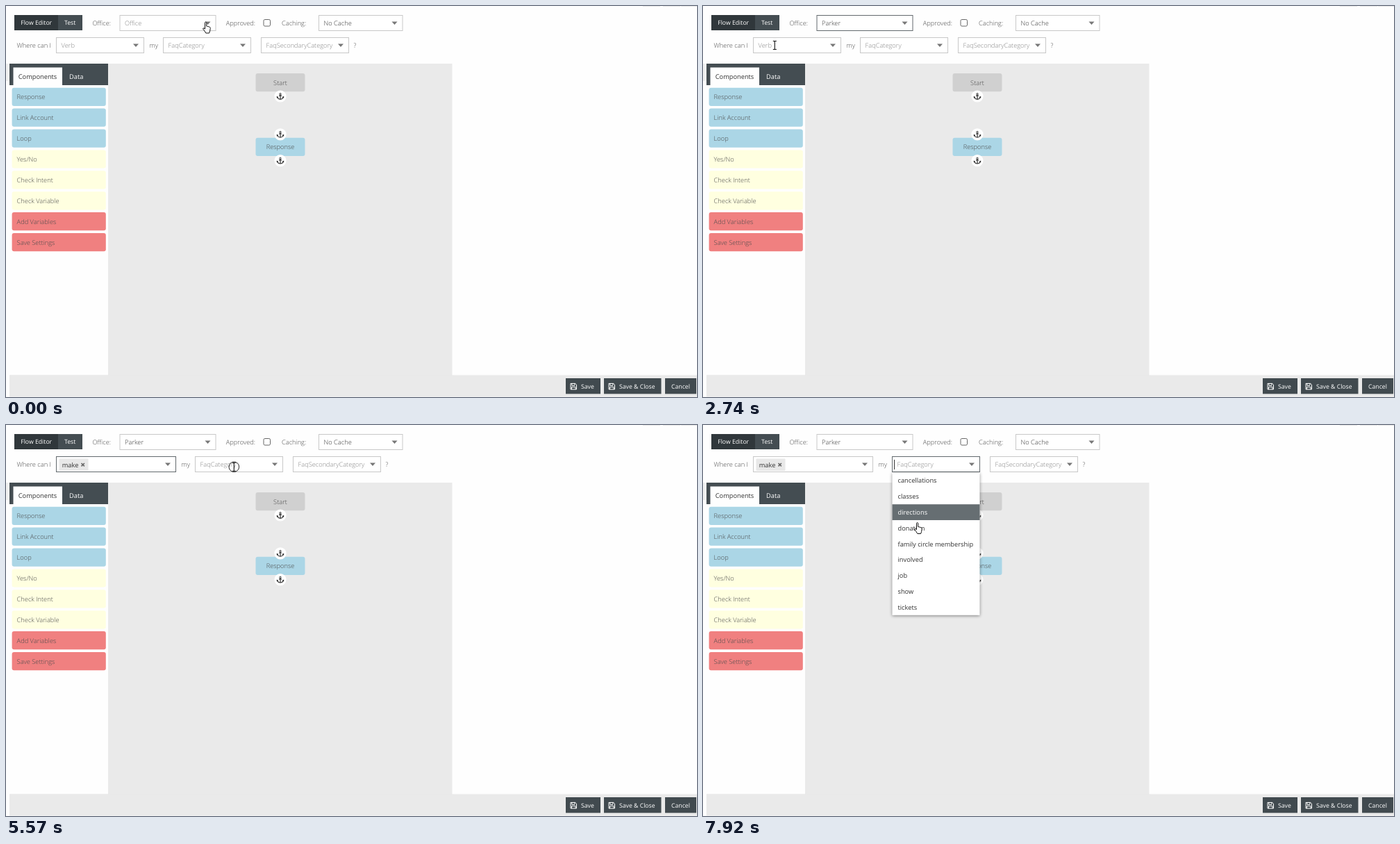
Animation, 995 px wide and 563 px high, one loop 8 s. Source, as an HTML page:

```html
<!DOCTYPE html>
<html lang="en">
<head>
<meta charset="utf-8">
<title>Flow editor</title>
<style>
html, body { margin: 0; width: 995px; height: 563px; overflow: hidden; background: #fefefe; }
svg { display: block; }
text { font: 300 9.28px "Open Sans", "Noto Sans", sans-serif; text-rendering: geometricPrecision; white-space: pre; }
.r { font-weight: 400; }
.b { font-weight: 400; font-size: 8.7px; }
.menu { filter: drop-shadow(0 1px 2px rgba(0, 0, 0, .45)); }
</style>
</head>
<body>
<svg width="995" height="563" viewBox="0 0 995 563">
  <g id="back"></g>
  <g id="live"></g>
</svg>
<script>
const LOOP = 8000, ROW = 22.8, DARK = '#444d52', TEXT = '#4a4a4a', HINT = '#858585';

const box = (x, y, w, h, fill, more = '') =>
  `<rect x="${x}" y="${y}" width="${w}" height="${h}" fill="${fill}" ${more}/>`;
// Text placed by the middle of its capitals
const text = (x, mid, s, fill = TEXT, more = '') =>
  `<text x="${x}" y="${mid + 3.3}" fill="${fill}" ${more}>${s}</text>`;
const path = (d, more) => `<path d="${d}" ${more}/>`;
const at = (x, y, s) => `<g transform="translate(${x} ${y})">${s}</g>`;

function field(x, y, w, label, focus, fill = HINT) {
  return box(x + .5, y + .5, w - 1, 22, '#fff', `stroke="${focus ? '#62696d' : '#c8c8c8'}"`) +
    text(x + 7.6, y + 11.4, label, fill) +
    path(`M${x + w - 16} ${y + 9.5}h8l-4 4.6z`, 'fill="#777"');
}

function menu(x, y, w, items, active) {
  return box(x, y, w, ROW * items.length, '#fff', 'class="menu"') +
    items.map((s, i) => {
      const on = i === active, top = y + ROW * i;
      return (on ? box(x, top, w, ROW, '#666e72') : '') +
        text(x + 8, top + 11.5, s, on ? '#fff' : '#333', 'class="r"');
    }).join('');
}

const anchor = (x, y) => at(x, y, '<circle r="8.6" fill="#fff"/>' +
  path('M0-2V4.2M-2-.8H2M-4 1.2C-3.6 3.4-2 4.3 0 4.3S3.6 3.4 4 1.2M-4.6 2.6V.8L-3 1.6M4.6 2.6V.8L3 1.6', 'fill="none" stroke="#333" stroke-width="1.2"') +
  '<circle cy="-3.2" r="1.2" fill="none" stroke="#333"/>');

const disk = x => at(x, 543, path('M.5.5H7.2L9 2.3V9H.5ZM2.3.5V3.4H6.4V.5M2 9V5.6H7.5V9', 'fill="none" stroke="#fff"'));

function button(x, w, label, icon) {
  return box(x, 536, w, 22.5, '#414a4f') + (icon ? disk(x + 6.5) : '') +
    text(x + (icon ? 22 : 9), 547.3, label, '#fff', 'class="b"');
}

function backdrop() {
  const blue = '#abd6e6', yellow = '#ffffe0', red = '#f08080';
  const parts = [['Response', blue], ['Link Account', blue], ['Loop', blue], ['Yes/No', yellow],
    ['Check Intent', yellow], ['Check Variable', yellow], ['Add Variables', red], ['Save Settings', red]];
  return [917, 946, 972].map(x => box(x, 0, 25, 1, '#e8e8e8')).join('') +
    box(12, 13, 63, 22, '#30373b') + text(21.2, 24, 'Flow Editor', '#fff', 'class="b"') +
    box(75, 13, 35, 22, DARK) + text(84, 24, 'Test', '#fff', 'class="b"') +
    text(124.5, 24.4, 'Office:') + text(316.7, 24.4, 'Approved:') + text(397, 24.4, 'Caching:') +
    box(371, 19.5, 9.5, 9.5, '#fff', 'rx="1.8" stroke="#666"') +
    field(450, 13, 121.5, 'No Cache', false, '#333') +
    text(15.6, 56.2, 'Where can I') +
    box(0, 83, 5, 25, '#f0f0f0') +
    box(5, 83, 637.5, 449, '#eaeaea') + box(5, 114, 142, 417.5, '#fefefe') +
    box(5, 83, 142, 31, DARK) + box(10.5, 88.5, 70.5, 25.5, '#fefefe') +
    text(17.7, 101.3, 'Components', '#333', 'class="r"') + text(91, 101.3, 'Data', '#fff', 'class="r"') +
    parts.map(([s, c], i) => box(8.6, 117.7 + i * 29.9, 135.2, 26.2, c, 'rx="3"') +
      text(15.6, 131 + i * 29.9, s)).join('') +
    box(359.5, 97, 71, 26.3, '#d0d0d0', 'rx="3"') + text(395, 110.2, 'Start', TEXT, 'text-anchor="middle"') +
    box(359.5, 189.7, 71, 26.3, blue, 'rx="3"') + text(395, 202.8, 'Response', TEXT, 'text-anchor="middle"') +
    anchor(395, 130) + anchor(395, 184.8) + anchor(395, 222.6) +
    box(5, 531.5, 990, 31, '#eaeaea') +
    button(806, 50, 'Save', true) + button(861, 82.5, 'Save &amp; Close', true) + button(949, 45, 'Cancel');
}

const offices = ['Aurora', 'Denver', 'general', 'Highlands Ranch', 'Littleton', 'Parker'];
const verbs = ['find out', 'get', 'make', 'purchase', 'register', 'rent'];
const topics = ['cancellations', 'classes', 'directions', 'donation', 'family circle membership',
  'involved', 'job', 'show', 'tickets'];

const outline = 'fill="#fff" stroke="#111" stroke-linejoin="round"';
const beam = path('M-2.5-6H-.6L0-5.4.6-6H2.5M0-5.4V5.4M-2.5 6H-.6L0 5.4.6 6H2.5', 'fill="none" stroke="#111" stroke-width="1.1"');
const cursors = {
  hand: path('M-2.5 2V-6.8a1.1 1.1 0 0 1 2.2 0V-2L1.5-1.6 3.3-1.1 4.7-.5Q5.4 0 5.2 1.5L4.6 5 3.6 8H-1.2L-3 5-5.2 2.2Q-5.6.6-4.2.8Z', outline),
  arrow: path('M-4-7V6L-1 3.2 1 8 3 7.1 1 2.5H5Z', outline),
  beam,
  click: beam + '<circle r="7.3" fill="none" stroke="#222"/>'
};

// Time, pointer x, pointer y, active menu row, pointer kind
const steps = [
  [0, 289, 31, 0, 'hand'], [920, 289, 31, 0, 'hand'], [1100, 281, 54, 0, 'hand'],
  [1280, 263, 90, 2, 'hand'], [1460, 243, 125, 3, 'hand'], [1640, 228, 152.5, 4, 'hand'],
  [1810, 224, 163, 5, 'hand'], [2190, 215, 150, 0, 'arrow'], [2370, 165, 105, 0, 'arrow'],
  [2550, 118, 68, 0, 'arrow'], [2740, 103.3, 56.5, 0, 'beam'], [4160, 98, 128, 2, 'hand'],
  [4350, 97, 85, 0, 'arrow'], [4890, 104, 82, 0, 'arrow'], [5230, 200, 76, 0, 'arrow'],
  [5400, 292, 64, 0, 'beam'], [5570, 328.3, 60.3, 0, 'click'], [5740, 328.3, 60.3, 0, 'beam'],
  [6080, 322, 92, 0, 'hand'], [6270, 318, 122, 1, 'hand'], [6450, 314, 150.5, 2, 'hand'],
  [6630, 312, 172, 3, 'hand'], [6810, 311, 186, 4, 'hand'], [7000, 311, 174, 4, 'hand'],
  [7180, 311, 162, 3, 'hand'], [7370, 312, 149.5, 2, 'hand'], [7920, 310, 148.5, 2, 'hand']
];

function scene(t) {
  const within = (a, b) => t >= a && t < b;
  const [, x, y, row, kind] = steps.findLast(s => s[0] <= t);
  const picked = t >= 4890, shift = picked ? 46 : 0;
  const caret = cx => box(cx, 50, 1, 14, '#333');
  let s = field(163.5, 13, 139, t < 2190 ? 'Office' : 'Parker', within(920, 2900), t < 2190 ? HINT : '#333') +
    field(72, 45, 127 + shift, picked ? '' : 'Verb', within(2900, 5740)) +
    text(206.5 + shift, 56.2, 'my') +
    field(226 + shift, 45, 127, 'FaqCategory', t >= 5740) +
    field(367 + shift, 45, 127, 'FaqSecondaryCategory', false) +
    text(500.5 + shift, 56.2, '?');
  if (picked) s += box(76.5, 48.5, 42, 17.5, '#e8e8e8', 'rx="1"') + text(80.7, 57.3, 'make', '#333', 'class="r"') +
    path('M108.5 55l4.4 4.4m0-4.4l-4.4 4.4', 'stroke="#666" stroke-width="1.6"');
  if (within(2900, 3420) || within(3970, 4350)) s += caret(76);
  if (within(5740, 6270) || within(6810, 7370) || t >= 7920) s += caret(275);
  if (within(920, 2190)) s += menu(164, 36, 138, offices, row);
  if (within(2900, 4350)) s += menu(73, 68.6, 126, verbs, row);
  if (t >= 5740) s += menu(272.5, 68.6, 126, topics, row);
  return s + at(x, y, cursors[kind]);
}

const live = document.getElementById('live');
document.getElementById('back').innerHTML = backdrop();
let shown = '';
function draw() {
  const next = scene(performance.now() % LOOP);
  if (next !== shown) live.innerHTML = shown = next;
  requestAnimationFrame(draw);
}
draw();
</script>
</body>
</html>
```
